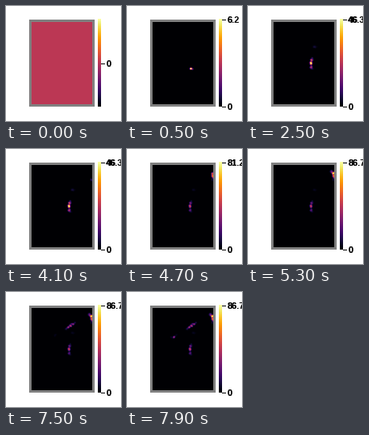
Write a matplotlib script that moves like this. It is 144 by 144 pixels and loops after 8 s.

```python
import numpy as np
import matplotlib.pyplot as plt
from matplotlib.animation import FuncAnimation
from matplotlib.patches import Rectangle

SIZE, DPI, STEP, LOOP = 144, 100, 100, 8000
LEFT, RIGHT, TOP, BOTTOM = 32, 108, 20, 123
VISIT_GAP, SPOTS, SPREAD, JITTER = 200, 5, 0.85, 0.7

# Each leg is a curve: start time, visits, strength, start, bend, end
LEGS = [
    (500, 6, 30, (80.8, 78.4), (76.8, 72), (80.8, 65)),
    (2300, 2, 20, (82.5, 51), (84, 51), (85, 51)),
    (4100, 7, 42, (107.5, 38.5), (108, 29), (103.5, 28)),
    (6100, 5, 38, (86, 38.7), (80.3, 41.5), (75.2, 46.5)),
    (7500, 3, 26, (61.5, 54.7), (59.3, 56), (55.5, 56.7)),
]
SCALE_PEAKS = {500: 6.2, 700: 24.8, 900: 36.8, 1100: 46.3, 4500: 81.2, 4900: 86.7}

rng = np.random.default_rng(4)
px, py = np.meshgrid(np.arange(LEFT, RIGHT) + 0.5, np.arange(TOP, BOTTOM) + 0.5)


def visit(center, strength):
    """A small grainy cluster of spots around one point."""
    heat = np.zeros(px.shape)
    for x, y in center + rng.normal(0, JITTER, (SPOTS, 2)).clip(-1.5, 1.5):
        r2 = (px - x) ** 2 + (py - y) ** 2
        heat += np.exp(-r2 / (2 * SPREAD ** 2)) * (r2 < 4)
    return 1.9 * strength * heat / SPOTS


def walk(start, count, strength, a, b, c):
    a, b, c = map(np.array, (a, b, c))
    for i, u in enumerate(np.linspace(0, 1, count)):
        center = (1 - u) ** 2 * a + 2 * u * (1 - u) * b + u ** 2 * c
        swell = 0.17 + 0.83 * max(0, np.sin(np.pi * u)) ** 0.7
        yield start + i * VISIT_GAP, visit(center, strength * swell)


VISITS = [v for leg in LEGS for v in walk(*leg)]

fig = plt.figure(figsize=(SIZE / DPI, SIZE / DPI), dpi=DPI, facecolor="white")
ax = fig.add_axes([0, 0, 1, 1])
ax.axis("off")

ax.add_patch(Rectangle((29, 17), 82, 109, fc="gray", lw=0, zorder=1))
heatmap = ax.imshow(np.full(px.shape, 0.5), cmap="inferno", vmin=0, vmax=1,
                    extent=(LEFT, RIGHT, BOTTOM, TOP), interpolation="nearest", zorder=2)
ax.imshow(np.linspace(1, 0, 110)[:, None], cmap="inferno", vmin=0, vmax=1,
          extent=(115, 119, 126, 16), interpolation="nearest")
ax.set(xlim=(0, SIZE), ylim=(SIZE, 0), aspect="auto")


class Tick:
    """A tick mark with a label and a second label overlapping it."""

    def __init__(self, y):
        self.mark = ax.add_patch(Rectangle((119, y), 5, 1, fc="black", lw=0))
        self.labels = [ax.text(x, y + 4, "", family="Liberation Sans", weight="bold",
                               size=11 * 72 / DPI, va="baseline") for x in (125.3, 126)]

    def show(self, text="", under=""):
        self.mark.set_visible(bool(text))
        for label, content in zip(self.labels, (text, under)):
            label.set_text(content)


high, middle, low = Tick(17), Tick(72), Tick(126)


def draw(frame):
    now = frame * STEP
    peaks = [peak for t, peak in SCALE_PEAKS.items() if t <= now]
    if peaks:
        heatmap.set_data(sum(heat for t, heat in VISITS if t <= now) / peaks[-1])
        high.show(f"{peaks[-1]}", f"{int(peaks[-1])}")
        middle.show()
        low.show("0", "0")
    else:
        heatmap.set_data(np.full(px.shape, 0.5))
        high.show()
        middle.show("0", "0")
        low.show()


anim = FuncAnimation(fig, draw, frames=LOOP // STEP, interval=STEP,
                     init_func=lambda: draw(0), repeat=True, repeat_delay=0)
plt.show()
```
